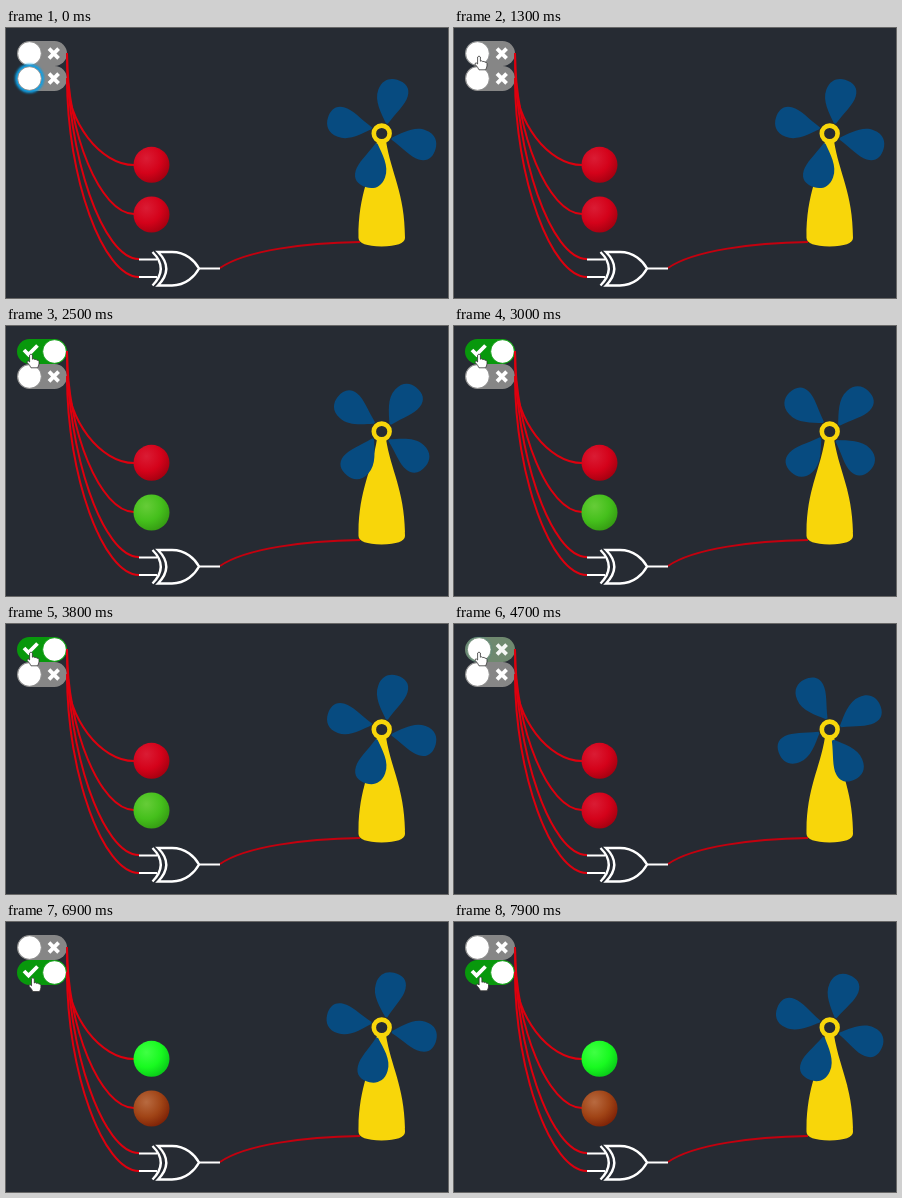
These frames come from a looping animation (442x270 px, 8 s). An HTML page:

```html
<!DOCTYPE html>
<html lang="en">
<head>
<meta charset="utf-8">
<title>Switches, XOR gate and fan</title>
<style>
html, body { margin: 0; width: 100%; height: 100%; overflow: hidden; background: #262b33; }
svg { display: block; width: 442px; height: 270px; }
.wire { fill: none; stroke: #de000e; stroke-width: 2; }
.gate { fill: none; stroke: #fff; stroke-width: 2.4; }
</style>
</head>
<body>
<svg viewBox="0 0 442 270">
  <defs>
    <path id="blade" fill="#074b80" d="M1,-11 C-6,-19 -17,-29 -16,-41 C-15.5,-52 -8,-56 -1,-56 C8,-56 14,-52 14,-43 C14,-34 8,-25 3,-11Z"/>
    <filter id="soft" x="-50%" y="-50%" width="200%" height="200%"><feGaussianBlur stdDeviation="1"/></filter>
  </defs>
  <rect width="442" height="270" fill="#262b33"/>
  <g id="switches"></g>
  <g id="wires" class="wire">
    <path d="M214,240 C240,222 300,215 354,214" stroke="#c4000e" stroke-width="1.8"/>
  </g>
  <g class="gate">
    <path d="M133,231.5H151M133,249H151M193,240.5H214" stroke-width="2"/>
    <path d="M146.5,224 Q163,240.5 146.5,257.5"/>
    <path d="M152,224 H166 C180,224 189,233 193,240.5 C189,248 180,257.5 166,257.5 H152 Q168.5,240.5 152,224Z"/>
  </g>
  <g id="lamps"></g>
  <path fill="#f8d60a" d="M371,113 C366,145 352,165 352.5,210 Q353,218 375.5,218.5 Q398.5,218 399,210 C399,165 385,145 380,113Z"/>
  <g transform="translate(375.7 105.5)">
    <g id="fan">
      <use href="#blade"/>
      <use href="#blade" transform="rotate(90)"/>
      <use href="#blade" transform="rotate(180)"/>
      <use href="#blade" transform="rotate(270)"/>
    </g>
    <circle r="7.9" fill="#262b33" stroke="#f8d60a" stroke-width="4.6"/>
  </g>
  <path id="hand" fill="#fff" stroke="#333" stroke-width=".8" stroke-linejoin="round"
    d="M-1.4,1 Q0,-1 1.4,1 V5.2 Q2.8,4.2 3.8,5.6 Q5.2,4.8 6,6.2 Q7.8,5.8 8,7.6 V10 Q7.6,12 6.6,13.8 H0 Q-1,11.4 -3.8,8.4 Q-4.2,6.6 -2.6,7 L-1.4,8Z"/>
</svg>
<script>
const LOOP = 8000;
const clicks = [
  { id: 0, down: 1300, up: 1440, on: 1, speed: 0.1905 },
  { id: 0, down: 4420, up: 4520, on: 0, speed: 0 },
  { id: 1, down: 5600, up: 5728, on: 1, speed: 0.1875 }
];
// time, x, y of the fingertip
const handPath = [
  [200, 32, -20], [700, 25, 28], [4800, 25, 28], [4900, 25.5, 32],
  [5050, 25.5, 32], [5400, 27, 56], [6500, 27, 56], [7900, 26.5, 55]
];
// start y, end x, end y; all leave the right edge of a switch
const wires = [[50, 128, 137], [25, 128, 186], [25, 133, 231], [50, 133, 249]];
const lampColors = {
  red: ['#da1c34', '#d4021a', '#a0000f'],
  lime: ['#40ff44', '#18fa20', '#08c418'],
  green: ['#66cc38', '#45c01c', '#339812'],
  brown: ['#b86a40', '#a04416', '#7a1e04']
};
const GREY = [134, 134, 134], GREEN = [8, 152, 12];

const $ = id => document.getElementById(id);
const clamp = v => Math.max(0, Math.min(1, v));
const mix = (a, b, p) => a + (b - a) * p;
const smooth = p => p * p * (3 - 2 * p);
const easeOut = p => 1 - (1 - p) ** 6;

function make(tag, attrs, parent) {
  const el = document.createElementNS('http://www.w3.org/2000/svg', tag);
  set(el, attrs);
  return parent.appendChild(el);
}
function set(el, attrs) {
  for (const key in attrs) el.setAttribute(key, attrs[key]);
}

const switches = [25.5, 50.5].map(y => {
  const g = make('g', { transform: `translate(11 ${y})` }, $('switches'));
  const icon = { fill: 'none', stroke: '#fff', 'stroke-width': 3.8 };
  return {
    track: make('rect', { y: -12.5, width: 50, height: 25, rx: 12.5 }, g),
    check: make('path', { ...icon, d: 'M7,-1.5 L11.5,3 L20.5,-6' }, g),
    cross: make('path', { ...icon, d: 'M32,-4.8 L41.6,4.8 M41.6,-4.8 L32,4.8' }, g),
    ring: make('circle', { fill: '#0b9fe4', filter: 'url(#soft)' }, g),
    thumb: make('circle', { r: 11.8, fill: '#fff', 'stroke-width': 0.8 }, g)
  };
});

// Each wire leaves vertically and arrives horizontally
for (const [y0, x1, y1] of wires) {
  const x0 = 61;
  make('path', { d: `M${x0},${y0} C${x0},${(y0 + y1) / 2} ${(x0 + x1) / 2},${y1} ${x1},${y1}` }, $('wires'));
}

for (const name in lampColors) {
  const grad = make('radialGradient', { id: name, cx: 0.36, cy: 0.32, r: 0.76 }, document.querySelector('defs'));
  lampColors[name].forEach((color, i) =>
    make('stop', { offset: [0, 0.55, 1][i], 'stop-color': color }, grad));
}
const lamps = [136.8, 186.5].map(cy => make('circle', { cx: 145.5, cy, r: 18 }, $('lamps')));

function switchState(id, t, duration, ease) {
  let value = 0;
  for (const c of clicks)
    if (c.id === id && t >= c.up) value = mix(1 - c.on, c.on, ease(clamp((t - c.up) / duration)));
  return value;
}

// Halo around a thumb: grows while pressed, fades after release
function halo(id, t) {
  let size = id === 1 ? 2.6 * (1 - easeOut(clamp((t - 200) / 500))) : 0;
  for (const c of clicks) {
    if (c.id !== id || t < c.down) continue;
    const grown = 8 * easeOut(clamp((Math.min(t, c.up) - c.down) / 500));
    size = grown * (1 - easeOut(clamp((t - c.up) / 500)));
  }
  return size;
}

function fanAngle(t) {
  let angle = 17;
  clicks.forEach((c, i) => {
    const end = i + 1 < clicks.length ? clicks[i + 1].up : LOOP;
    angle += c.speed * Math.max(0, Math.min(t, end) - c.up);
  });
  return angle;
}

function handAt(t) {
  const i = handPath.findIndex(k => k[0] > t);
  if (i === 0) return handPath[0].slice(1);
  if (i < 0) return handPath[handPath.length - 1].slice(1);
  const a = handPath[i - 1], b = handPath[i];
  const p = smooth((t - a[0]) / (b[0] - a[0]));
  return [mix(a[1], b[1], p), mix(a[2], b[2], p)];
}

function draw(t) {
  switches.forEach((s, id) => {
    const pos = switchState(id, t, 500, easeOut);
    const tint = switchState(id, t, 250, smooth);
    const color = `rgb(${GREY.map((v, i) => Math.round(mix(v, GREEN[i], tint)))})`;
    const cx = mix(12.5, 37.5, pos), size = halo(id, t);
    set(s.track, { fill: color });
    set(s.check, { opacity: pos });
    set(s.cross, { opacity: 1 - pos });
    set(s.thumb, { cx, stroke: color });
    set(s.ring, { cx, r: 11.8 + size, opacity: clamp(size / 2) });
  });
  const first = switchState(0, t, 1, Math.round), second = switchState(1, t, 1, Math.round);
  set(lamps[0], { fill: `url(#${second ? 'lime' : 'red'})` });
  set(lamps[1], { fill: `url(#${first ? 'green' : second ? 'brown' : 'red'})` });
  set($('fan'), { transform: `rotate(${fanAngle(t)})` });
  set($('hand'), { transform: `translate(${handAt(t)})` });
}

function tick() {
  draw(performance.now() % LOOP);
  requestAnimationFrame(tick);
}
tick();
</script>
</body>
</html>
```
